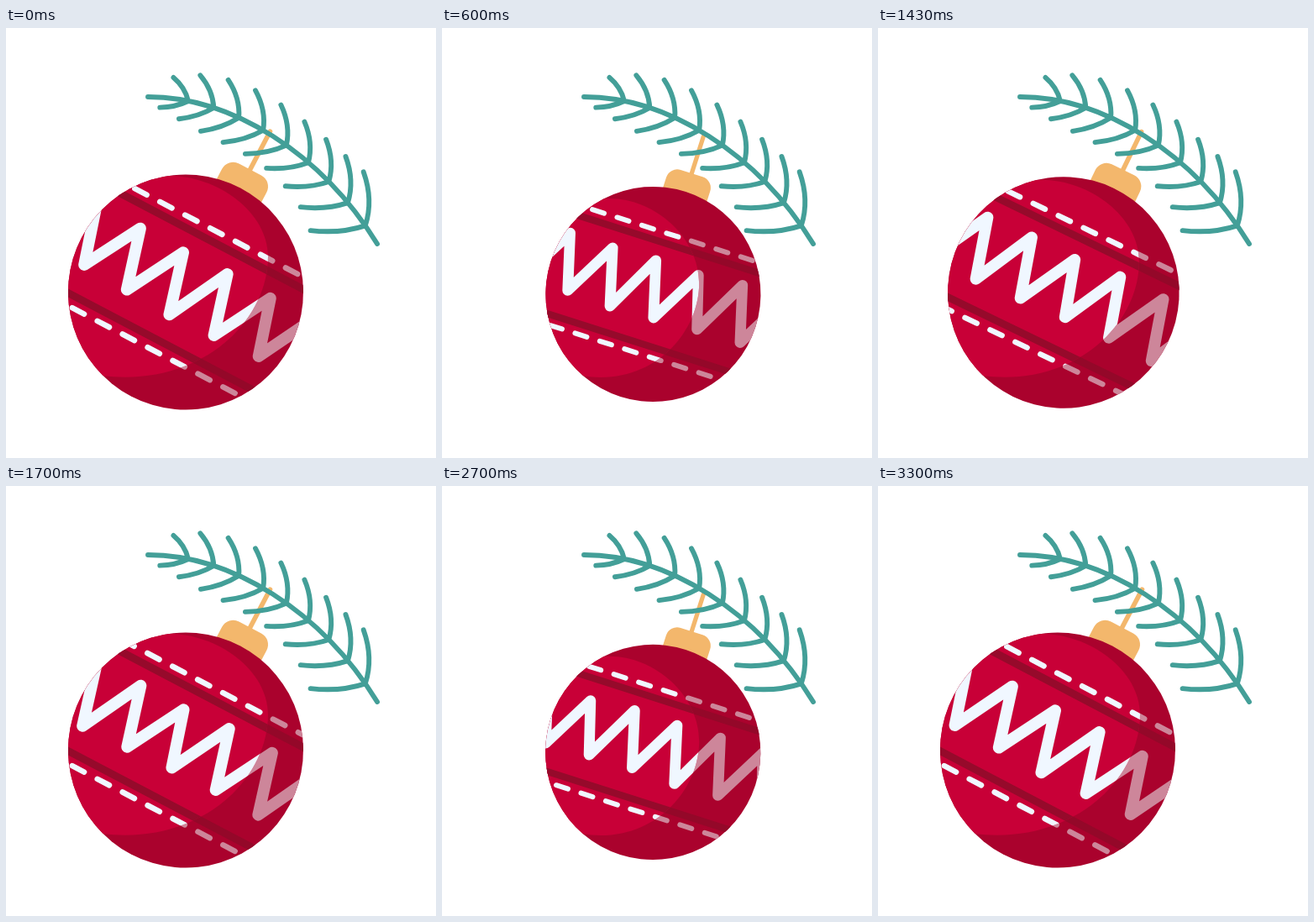
These frames come from a looping animation (512 px wide and 512 px high, 3.36 s). An HTML page with a canvas:

```html
<!DOCTYPE html>
<html lang="en">
<head>
<meta charset="utf-8">
<title>Swinging bauble</title>
<style>
html, body { margin: 0; width: 100%; height: 100%; overflow: hidden; background: #fff; }
canvas { display: block; width: 512px; height: 512px; }
</style>
</head>
<body>
<canvas id="stage" width="512" height="512"></canvas>
<script>
const ctx = document.getElementById('stage').getContext('2d');
const LOOP = 3360, TICK = 1000 / 15, STEPS = 48;
const R = 140;
const TEAL = '#439f98', GOLD = '#f3b76c';
const LIT = { ball: '#c80037', band: '#960a2b', ink: '#f0f7ff' };
const SHADE = { ball: '#aa022d', band: '#940829', ink: '#cd869a' };
const DEG = Math.PI / 180;

const mix = (a, b, k) => a + (b - a) * k;
const smooth = k => {
  k = Math.max(0, Math.min(1, k));
  return k * k * (3 - 2 * k);
};

// Fifteen poses a second, with one longer rest at the first right turn
function stepAt(ms) {
  const t = Math.floor(ms / 10) * 10;
  const count = from => Math.floor((t - from + 6.7) / TICK);
  return t < 900 ? Math.min(11, count(0)) : Math.min(STEPS, 12 + count(900));
}

// 0 is far left, 1 is far right; the bauble rests briefly at each end
function swingAt(n) {
  const q = n % 25.2;
  return smooth(q / 10) - smooth((q - 12.7) / 10);
}

function stroke(color, width) {
  ctx.strokeStyle = color;
  ctx.lineWidth = width;
  ctx.stroke();
}

const bezier = (a, b, c, d, t) =>
  mix(mix(mix(a, b, t), mix(b, c, t), t), mix(mix(b, c, t), mix(c, d, t), t), t);

const STEM_X = [169, 268, 375, 442], STEM_Y = [82, 82, 148, 257];

function needle(x, y, angle, length, bulge) {
  const dx = length * Math.cos(angle * DEG), dy = length * Math.sin(angle * DEG);
  ctx.moveTo(x + dx, y + dy);
  ctx.quadraticCurveTo(x + 0.47 * dx - bulge * dy, y + 0.47 * dy + bulge * dx, x, y);
}

function drawBranch() {
  ctx.beginPath();
  ctx.moveTo(STEM_X[0], STEM_Y[0]);
  ctx.bezierCurveTo(STEM_X[1], STEM_Y[1], STEM_X[2], STEM_Y[2], STEM_X[3], STEM_Y[3]);
  for (let i = 0; i < 9; i++) {
    const t = 0.16 + 0.0965 * i + 0.012 * Math.sin(Math.PI * i / 8);
    const x = bezier(...STEM_X, t), y = bezier(...STEM_Y, t);
    const length = 48.5 + 15.5 * (i / 4 - 1) ** 3;
    const lean = 32 * Math.exp(-i / 2.8);
    const droop = 5 + 14.5 * Math.exp(-(((i - 1.9) / 2.4) ** 2));
    needle(x, y, -90 - lean, length, 0.17);
    needle(x, y, 180 - droop, length + 1.5, -0.11);
  }
  stroke(TEAL, 5.9);
}

function place(pose) {
  ctx.translate(pose.x, pose.y);
  ctx.rotate(pose.angle);
  ctx.scale(pose.scale, pose.scale);
}

function drawHook(pose) {
  ctx.save();
  place(pose);
  ctx.beginPath();
  ctx.moveTo(0, -216);
  ctx.lineTo(0, -155);
  stroke(GOLD, 5.7);
  ctx.fillStyle = GOLD;
  ctx.beginPath();
  ctx.roundRect(-30, -165, 60, 42, [15, 15, 0, 0]);
  ctx.fill();
  ctx.restore();
}

// Runs a whole number of gaps to the left in one loop
function drawDashes(y, gaps, n, color) {
  const gap = 33.8;
  const shift = (-103 - gaps * gap * n / STEPS) % gap;
  ctx.beginPath();
  for (let i = -5; i <= 5; i++) {
    const x = shift + i * gap;
    ctx.moveTo(x - 8, y);
    ctx.lineTo(x + 8, y);
  }
  stroke(color, 6.6);
}

// Slightly uneven teeth, the same again after four; the strip moves four teeth per loop
function drawZigzag(n, color) {
  const pitch = 58.6, s = n / STEPS;
  const drop = 3.5 * s - 2.8 * Math.sin(Math.PI * s);
  ctx.beginPath();
  for (let k = -3; k < 10; k++) {
    const x = -83.2 + pitch * (k - 4 * s);
    const y = drop - 0.875 * (k - k % 4);
    ctx.lineTo(x, y - 41.2 - 0.8 * Math.cos(Math.PI * k));
    ctx.lineTo(x + 19.7, y + 30 + 2.7 * Math.sin(Math.PI * k / 2));
  }
  stroke(color, 14);
}

function drawBall(pose, n, tone) {
  ctx.save();
  place(pose);
  ctx.beginPath();
  ctx.arc(0, 0, R, 0, 2 * Math.PI);
  ctx.fillStyle = tone.ball;
  ctx.fill();
  ctx.clip();
  ctx.fillStyle = tone.band;
  ctx.fillRect(-R, -72.5, 2 * R, 9);
  ctx.fillRect(-R, 61.5, 2 * R, 9);
  drawDashes(-81, 5, n, tone.ink);
  drawDashes(79.3, 6, n, tone.ink);
  drawZigzag(n, tone.ink);
  ctx.restore();
}

// The lit side: from the top, round its rightmost point, to the lower left
function clipLit(p) {
  const top = { x: 185 + 8 * p, y: 176 + 28 * p };
  const side = { x: 312 - 6 * p, y: 272 + 33 * p };
  const low = { x: 115 + 53 * p, y: 414 };
  ctx.beginPath();
  ctx.moveTo(top.x, top.y);
  ctx.bezierCurveTo(mix(top.x, side.x, 0.49), top.y - 4,
    side.x, mix(side.y, top.y, 0.57), side.x, side.y);
  ctx.bezierCurveTo(side.x, mix(side.y, low.y, 0.55),
    mix(low.x, side.x, 0.59), low.y + 14, low.x, low.y);
  ctx.lineTo(0, low.y);
  ctx.lineTo(0, top.y);
  ctx.closePath();
  ctx.clip();
}

function draw(ms) {
  const n = stepAt(ms);
  const p = swingAt(n);
  const pose = {
    x: 214 + 38.5 * p,
    y: 314.5 + 2.5 * p,
    angle: (27.7 - 10.3 * p) * DEG,
    scale: 1 - 0.088 * p
  };
  ctx.fillStyle = '#fff';
  ctx.fillRect(0, 0, 512, 512);
  ctx.lineCap = ctx.lineJoin = 'round';
  drawHook(pose);
  drawBranch();
  drawBall(pose, n, SHADE);
  ctx.save();
  clipLit(p);
  drawBall(pose, n, LIT);
  ctx.restore();
}

const start = performance.now();
function frame() {
  draw((performance.now() - start) % LOOP);
  requestAnimationFrame(frame);
}
frame();
</script>
</body>
</html>
```
